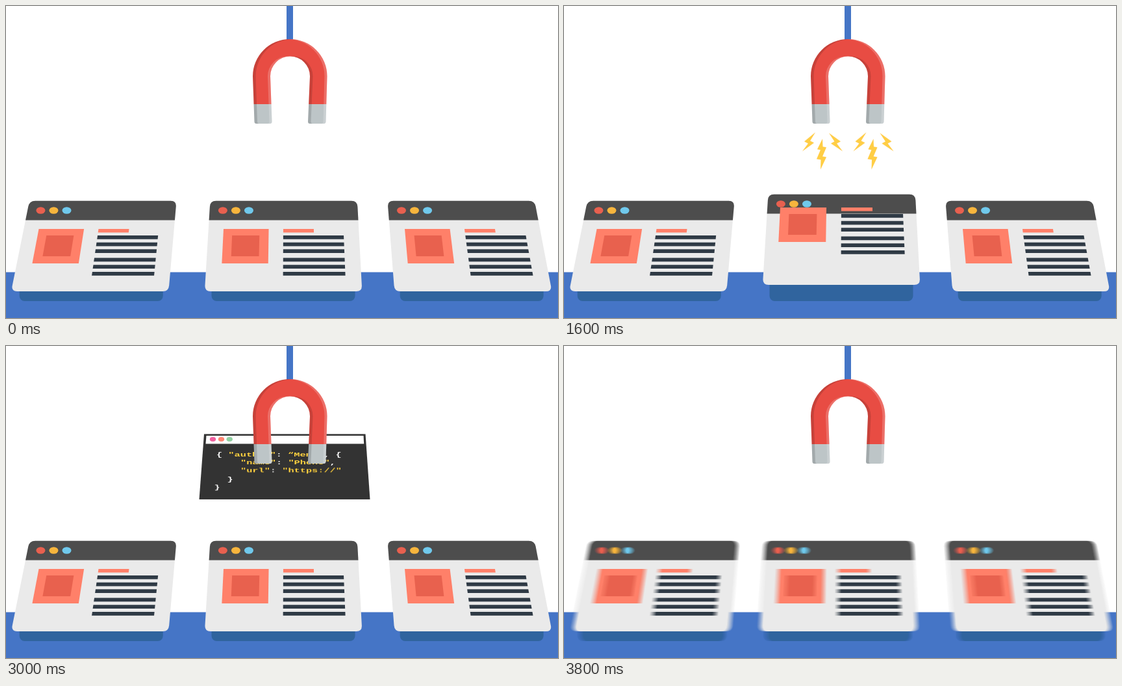
Write an HTML page that moves like this. It is 850 by 480 pixels and loops after 3840 ms.

```html
<!DOCTYPE html>
<html lang="en">
<head>
<meta charset="utf-8">
<title>Magnet</title>
<style>
  html, body { margin: 0; width: 100%; height: 100%; overflow: hidden; background: #fff; }
  svg { display: block; width: 850px; height: 480px; }
  text { font: bold 15.3px "Liberation Mono", "DejaVu Sans Mono", monospace; white-space: pre; fill: #ffd23f; }
  .w { fill: #fff; }
</style>
</head>
<body>
<svg viewBox="0 0 850 480">
  <defs>
    <path id="horseshoe" d="M380 108A57.25 57 0 0 1 494.5 108L492.5 178q-.2 3-3 3H468q-3 0-3-3L468 108A30.5 30.5 0 0 0 407 108L409.5 178q0 3-3 3H385.500q-3 0-3-3Z"/>
    <clipPath id="inside"><use href="#horseshoe"/></clipPath>
    <mask id="darkEdge"><rect width="850" height="480" fill="#fff"/><use href="#horseshoe" x="4.500"/></mask>
    <mask id="lightEdge"><rect width="850" height="480" fill="#fff"/><use href="#horseshoe" x="-4"/></mask>
    <g id="magnet">
      <path d="M432-300h10V55h-10Z" fill="#4575c6"/>
      <g clip-path="url(#inside)">
        <path d="M370 40h135V151H370Z" fill="#e84c43"/>
        <path d="M370 151h135v35H370Z" fill="#bdc5c7"/>
        <path d="M370 40h135v146H370Z" opacity=".14" mask="url(#darkEdge)"/>
        <path d="M370 40h135v146H370Z" fill="#fff" opacity=".2" mask="url(#lightEdge)"/>
      </g>
    </g>
    <g id="panel">
      <path d="M305 135.500H553.500L560.500 236H297.500Z" fill="#333"/>
      <path d="M308.500 138H550.500L551.200 150.500H307.500Z" fill="#fff"/>
      <ellipse cx="318.500" cy="143.500" rx="4.700" ry="3.400" fill="#f0609f"/>
      <ellipse cx="331.500" cy="143.500" rx="4.700" ry="3.400" fill="#ff8673"/>
      <ellipse cx="344.200" cy="143.500" rx="4.700" ry="3.400" fill="#8fd0a0"/>
      <text transform="translate(324 170) scale(1 .65)"><tspan class="w">{ </tspan>"author"<tspan class="w">: </tspan>“Menu”<tspan class="w">, {</tspan></text>
      <text transform="translate(361 182) scale(1 .65)">"name"<tspan class="w">: </tspan>"Phone"<tspan class="w">,</tspan></text>
      <text transform="translate(361 194.500) scale(1 .65)">"url"<tspan class="w">: </tspan>"https://"</text>
      <text class="w" transform="translate(340.500 208) scale(1 .65)">}</text>
      <text class="w" transform="translate(320.500 220.500) scale(1 .65)">}</text>
    </g>
    <g id="sparks" fill="#ffce45">
      <path d="M387 188L370 202L376 205L367 217L385 204L379 201Z"/>
      <path d="M398 198L390 214L395 215L389 229L395.500 230L395 245L404 226L398 225L404 211L398.500 210Z"/>
      <path d="M408 189L426 202L420 205L429 217L411 205L416.500 202Z"/>
    </g>
  </defs>
  <g id="stage"></g>
</svg>
<script>
const LOOP = 3840, STEP = 40, SHUTTER = 20, SAMPLES = 16;
const VANISH = 435;
const stage = document.getElementById('stage');

const clamp = u => Math.min(1, Math.max(0, u));
const ramp = (t, a, b) => clamp((t - a) / (b - a));
const smooth = u => u * u * (3 - 2 * u);
const cubic = u => u < .5 ? 4 * u ** 3 : 1 - 4 * (1 - u) ** 3;
const mix = (a, b, u) => a + (b - a) * u;
const n = v => +v.toFixed(2);

// Tabletop perspective: x spreads away from the vanishing line as y grows.
const spread = (x, y) => VANISH + (x - VANISH) * (1 + (y - 300) / 139 * .0703);

function quad(left, right, top, bottom, fill, rTop = 0, rBottom = rTop) {
  const pts = [[left, top, rTop], [right, top, rTop], [right, bottom, rBottom], [left, bottom, rBottom]]
    .map(([x, y, r]) => [spread(x, y), y, r]);
  const toward = ([x, y, r], [x2, y2]) => {
    const k = r / Math.hypot(x2 - x, y2 - y);
    return `${n(mix(x, x2, k))} ${n(mix(y, y2, k))}`;
  };
  const d = pts.map((p, i) => {
    const start = toward(p, pts[(i + 3) % 4]), end = toward(p, pts[(i + 1) % 4]);
    return `${i ? 'L' : 'M'}${start}Q${n(p[0])} ${n(p[1])} ${end}`;
  });
  return `<path d="${d.join('')}Z" fill="${fill}"/>`;
}

function shadow(x) {
  const cx = 427 + (x - 314.4) * 1.0625;
  return `<rect x="${n(cx - 110.5)}" y="418" width="221" height="36" rx="8" fill="#30649e"/>`;
}

function browser(x, lift, rise) {
  const dots = ['#e8604f', '#f7b53d', '#70c9ec'].map((color, i) =>
    `<ellipse cx="${n(spread(x + 20.2 + 19.9 * i, 314.5))}" cy="314.500" rx="7" ry="5.200" fill="${color}"/>`);
  const lines = [353, 363.7, 374.3, 387.6, 398.3, 409].map(y =>
    quad(x + 112.7, x + 203.4, y, y + 5.7, '#2f3a45'));
  return `<g transform="translate(0 ${n(-lift)})">
    ${quad(x, x + 226.5, 299.7, 439, '#eaeaea', 9)}
    ${quad(x, x + 226.5, 299.7, 329.5, '#4d4d4d', 9, 0)}${dots.join('')}</g>
    <g transform="translate(427 ${n(-rise)}) scale(${1 + rise * .00066} 1) translate(-427 0)">
    ${quad(x + 22.7, x + 90.8, 343, 396, '#ff8069')}
    ${quad(x + 36, x + 77, 353, 385, '#e8614e')}
    ${quad(x + 112.7, x + 158.7, 343, 348.5, '#ff8069')}${lines.join('')}</g>`;
}

function panel(t, shift) {
  if (t < 1870 || t > 3400) return '';
  const climb = clamp(.0375 * (t - 1840) ** 2 / 184.5);
  const top = mix(320, 135.5, climb);
  const scale = mix(.93, 1, climb ** 3);
  const y = top + (climb < 1 ? 0 : shift);
  return `<use href="#panel" transform="translate(429 ${n(y)}) scale(${scale.toFixed(4)}) translate(-429 -135.500)"/>`;
}

function magnetShift(t) {
  if (t >= 3440) return -195 * (1 - smooth(ramp(t, 3520, 3720)));
  if (t >= 3000) return -240 * cubic(ramp(t, 3000, 3380));
  const jolt = 1 - (1 - ramp(t, 1880, 1950)) ** 2;
  return -19 * jolt * (1 - smooth(ramp(t, 1950, 2220)));
}

function sparks(t) {
  if (t < 920 || t >= 1920) return '';
  const y = n(3.5 * (1 - Math.cos((t - 920) / 400 * 3 * Math.PI)));
  return `<use href="#sparks" y="${y}"/><use href="#sparks" x="78.500" y="${y}"/>`;
}

function scene(t) {
  const pull = smooth(ramp(t, 920, 1340));
  const kick = ramp(t, 1880, 1910);
  const held = 1 - smooth(ramp(t, 1920, 2000));
  const lift = (10 * pull + 5 * kick) * held;
  const rise = (33 * pull + 22 * kick) * held;
  const u = ramp(t, 3510, 3820);
  const slide = .6 * smooth(u) + .4 * u;
  const xs = [[-234, 45], [36, 314.4], [314.4, 593.5], [587.5, 870]].map(([a, b]) => mix(a, b, slide));
  const shift = magnetShift(t);
  return `<path d="M0 0H850V480H0Z" fill="#fff"/><path d="M0 409.500H850V480H0Z" fill="#4575c6"/>
    ${xs.map(shadow).join('')}
    ${xs.map((x, i) => i === 2 ? browser(x, lift, rise) : browser(x, 0, 0)).join('')}
    ${panel(t, shift)}<use href="#magnet" y="${n(shift)}"/>${sparks(t)}`;
}

// Average several moments inside the shutter to get motion blur.
function exposure(t) {
  const first = scene(t);
  if (first === scene(t + SHUTTER)) return first;
  return Array.from({ length: SAMPLES }, (_, i) =>
    `<g opacity="${1 / (i + 1)}">${scene(t + SHUTTER * i / (SAMPLES - 1))}</g>`).join('');
}

let shown = '';
const begin = performance.now();
function tick() {
  const t = Math.floor((performance.now() - begin) % LOOP / STEP) * STEP;
  if (t !== shown) {
    shown = t;
    stage.innerHTML = exposure(t);
  }
  requestAnimationFrame(tick);
}
tick();
</script>
</body>
</html>
```
